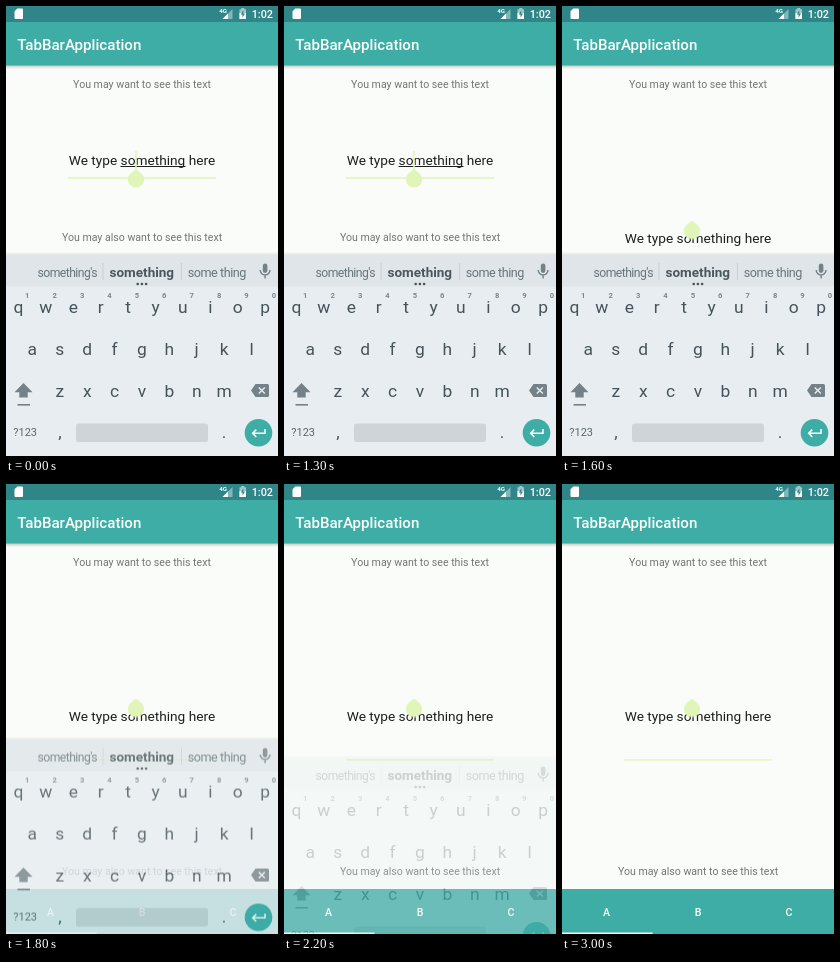
Animation, 272 px wide and 450 px high, one loop 3100 ms. Source, as an HTML page:

```html
<!DOCTYPE html>
<html lang="en">
<head>
<meta charset="utf-8">
<title>Tab bar and keyboard</title>
<style>
  html, body { margin: 0; width: 100%; height: 100%; overflow: hidden; background: #f9fcf8; }
  svg { display: block; width: 100%; height: 100%; font-family: Roboto, sans-serif; }
  .mid { text-anchor: middle; }
  .label { font-size: 10.58px; fill: #737674; }
  .input { font-size: 13.7px; fill: #1c1f1e; }
  .accent { fill: #e1f5b8; }
  .tab { font-size: 10.6px; font-weight: 500; fill: #fff; }
  .key { font-size: 17.4px; fill: #47535a; }
  .hint { font-size: 7.6px; font-weight: 700; fill: #7b868c; }
  .word { fill: #68757c; }
  .icon { fill: #758188; }

  .anim { animation: 3.1s step-end infinite; }
  #typing { animation-name: typing; }
  #relaid { animation-name: relaid; }
  #caret { animation-name: caret; }
  #handle { animation-name: handle; }
  #tabs { animation-name: tabs; }
  #line { animation-name: line; }
  #keyboard { animation: slide 3.1s linear infinite; }

  @keyframes typing { 0% { opacity: 1; } 45%, 100% { opacity: 0; } }
  @keyframes relaid { 0% { opacity: 0; } 45%, 100% { opacity: 1; } }
  @keyframes caret { 0% { opacity: 1; } 15.97% { opacity: 0; } 32.1%, 100% { opacity: 1; } }
  @keyframes handle { 0% { transform: none; } 51.45%, 100% { transform: translateY(51.5px); } }
  @keyframes tabs {
    0% { opacity: 0; transform: translateY(-201px); }
    45% { opacity: 1; transform: translateY(-201px); }
    51.45%, 100% { opacity: 1; transform: none; }
  }
  @keyframes line { 0% { fill: #dcf3b6; } 51.45%, 100% { fill: #effaf1; } }
  @keyframes slide {
    0%, 53.55% { opacity: 1; transform: none; }
    77.3%, 100% { opacity: 0; transform: translateY(34px); }
  }
</style>
</head>
<body>
<svg viewBox="0 0 272 450" preserveAspectRatio="none">
  <defs>
    <linearGradient id="shade" x2="0" y2="1">
      <stop stop-color="#000" stop-opacity=".22"/>
      <stop offset="1" stop-color="#000" stop-opacity="0"/>
    </linearGradient>
    <linearGradient id="rise" x2="0" y2="1">
      <stop stop-color="#000" stop-opacity="0"/>
      <stop offset="1" stop-color="#000" stop-opacity=".1"/>
    </linearGradient>
  </defs>

  <rect width="272" height="450" fill="#f9fcf8"/>
  <text class="label mid" x="136" y="82">You may want to see this text</text>

  <g id="typing" class="anim">
    <text class="input mid" x="136" y="159">We type something here</text>
    <rect x="114.5" y="160" width="65" height="1" fill="#1c1f1e"/>
    <rect class="accent" x="62" y="171.2" width="148" height="1.6"/>
    <rect id="caret" class="accent anim" x="129.2" y="145" width="1.6" height="20"/>
    <text class="label mid" x="136" y="235">You may also want to see this text</text>
  </g>

  <g id="relaid" class="anim">
    <text class="input mid" x="136" y="237">We type something here</text>
    <rect class="accent" x="62" y="275.2" width="148" height="1.4"/>
    <text class="label mid" x="136" y="390.5">You may also want to see this text</text>
  </g>

  <g id="tabs" class="anim">
    <rect y="405" width="272" height="45" fill="#3eada6"/>
    <rect id="line" class="anim" y="448.5" width="90.5" height="1.5"/>
    <text class="tab mid" x="44.5" y="431.7">A</text>
    <text class="tab mid" x="136" y="431.7">B</text>
    <text class="tab mid" x="227" y="431.7">C</text>
  </g>

  <path id="handle" class="accent anim" d="M130 163 L136 168 A8.1 8.1 0 1 1 124 168 Z"/>

  <!-- toolbar and status bar -->
  <rect y="59" width="272" height="4" fill="url(#shade)"/>
  <rect y="16" width="272" height="43.5" fill="#3eada6"/>
  <text x="11.3" y="43.6" font-size="15.1" font-weight="500" fill="#fff">TabBarApplication</text>
  <rect width="272" height="16" fill="#2f8588"/>
  <g fill="#fff">
    <path d="M11.3 2.5 H16 Q17 2.5 17 3.5 V12 Q17 13 16 13 H9.5 Q8.5 13 8.5 12 V5.3 Z"/>
    <text x="213.2" y="7" font-size="6.2" font-weight="700">4G</text>
    <path d="M226.5 3 V13 H216.5 Z" opacity=".4"/>
    <path d="M222 7.5 V13 H216.5 Z"/>
    <path d="M235.3 2 H238.3 V3.2 H240 V13 H233.5 V3.2 H235.3 Z" opacity=".55"/>
    <path d="M233.5 7 H240 V13 H233.5 Z"/>
    <path d="M237.3 4.2 L234.8 8.6 H236.5 V11.8 L239 7.4 H237.3 Z" fill="#2f8588"/>
    <text x="267" y="11.8" font-size="10.8" font-weight="500" text-anchor="end">1:02</text>
  </g>

  <g id="keyboard">
    <rect y="246" width="272" height="3" fill="url(#rise)"/>
    <rect y="249" width="272" height="201" fill="#e7edf0"/>
    <rect y="249" width="272" height="31.5" fill="#dfe5e8"/>
    <g class="word mid">
      <text x="61.3" y="270.5" font-size="12.2" letter-spacing="-.55">something's</text>
      <text x="135.8" y="270.5" font-size="13.5" font-weight="700" fill="#4b575e">something</text>
      <text x="210.8" y="270.5" font-size="12.6" letter-spacing="-.45">some thing</text>
    </g>
    <path d="M97 257 V274 M175.5 257 V274" stroke="#c9d0d4"/>
    <g fill="#47535a">
      <circle cx="131.7" cy="278" r="1.3"/><circle cx="135.9" cy="278" r="1.3"/><circle cx="140.1" cy="278" r="1.3"/>
    </g>
    <rect class="icon" x="256.8" y="257.5" width="4.6" height="9.4" rx="2.3"/>
    <path d="M254.2 264 A4.9 4.9 0 0 0 264 264 M259.1 269 V272.5" fill="none" stroke="#758188" stroke-width="1.4"/>

    <g id="keys"></g>

    <path class="icon" d="M17.5 377 L26.5 386.3 H21.7 V391.5 H13.3 V386.3 H8.5 Z"/>
    <rect class="icon" x="11.5" y="398" width="12.5" height="1.6"/>
    <path class="icon" d="M249.5 378 H261.5 Q263 378 263 379.5 V389.5 Q263 391 261.5 391 H249.5 L245 384.5 Z"/>
    <path d="M252.8 381.5 L258.8 387.5 M258.8 381.5 L252.8 387.5" stroke="#e7edf0" stroke-width="1.4"/>
    <text x="7.3" y="430.3" font-size="11" fill="#5b676e">?123</text>
    <rect x="70" y="417.5" width="132" height="18.5" rx="2.5" fill="#ced4d7"/>
    <circle cx="252.5" cy="426.8" r="13.8" fill="#3eada6"/>
    <path d="M259 423 V427.3 H247 M250.3 423.6 L246.6 427.3 L250.3 431" fill="none" stroke="#fff" stroke-width="1.5"/>
  </g>
</svg>
<script>
  const keys = document.getElementById('keys');

  function put(char, x, y, cls) {
    const t = document.createElementNS(keys.namespaceURI, 'text');
    t.setAttribute('x', x);
    t.setAttribute('y', y);
    t.setAttribute('class', cls + ' mid');
    t.textContent = char;
    keys.append(t);
  }

  function row(chars, x, y, cls) {
    [...chars].forEach((c, i) => put(c, x + i * 27.4, y, cls));
  }

  row('qwertyuiop', 12.5, 306.5, 'key');
  row('1234567890', 21.3, 291.7, 'hint');
  row('asdfghjkl', 26.3, 348.6, 'key');
  row('zxcvbnm', 53.8, 390.6, 'key');
  put(',', 54, 432, 'key');
  put('.', 218, 432, 'key');
</script>
</body>
</html>
```
